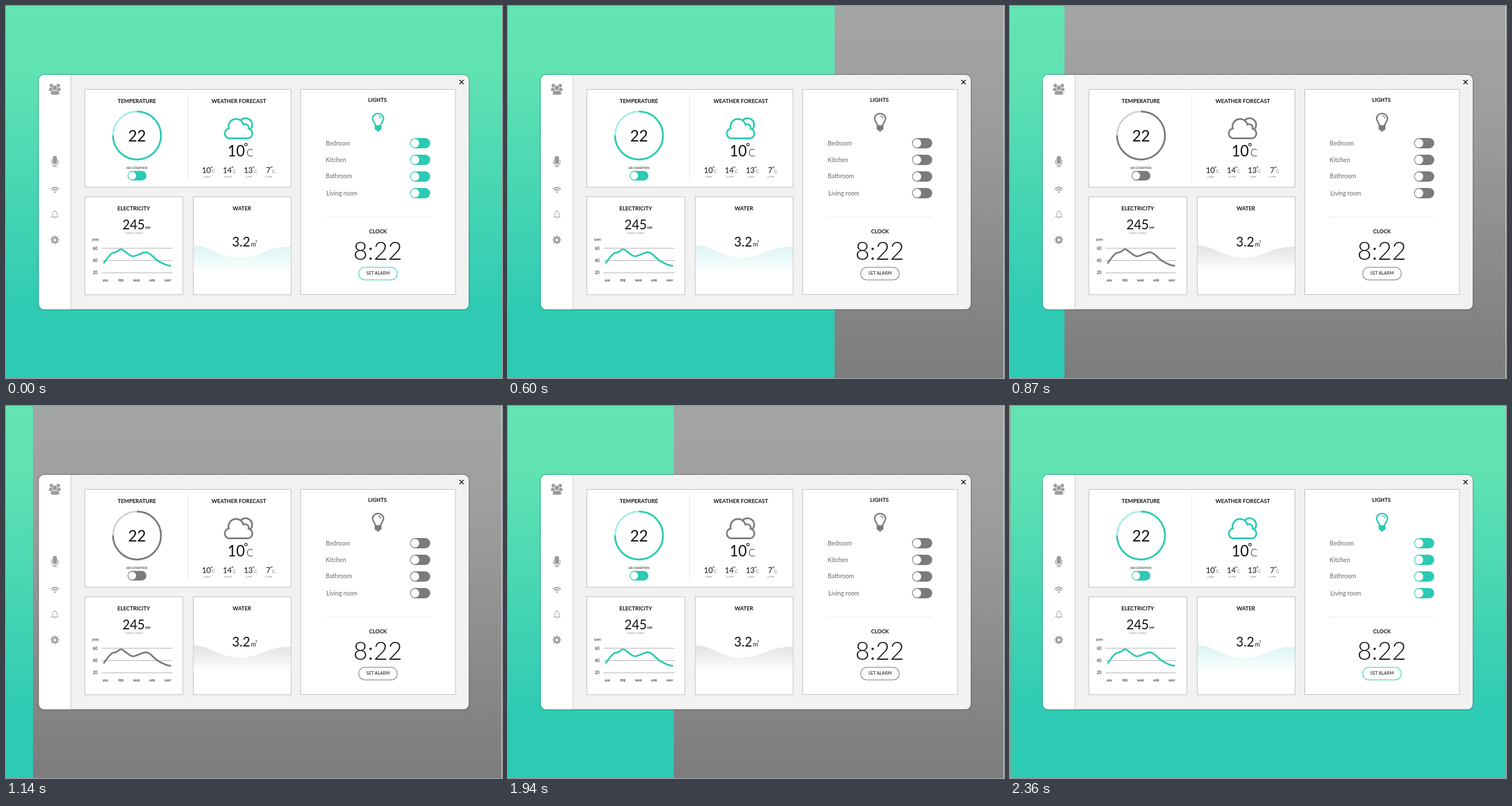
These frames come from a looping animation (864x648 px, 3.13 s). An HTML page:

```html
<!DOCTYPE html>
<html lang="en">
<head>
<meta charset="utf-8">
<title>Smart home dashboard</title>
<style>
  html, body { margin: 0; width: 100%; height: 100%; overflow: hidden; background: #fff; }
  svg { position: absolute; left: 0; top: 0; }
  text { font-family: Lato, "Open Sans", sans-serif; text-anchor: middle; }
  #seam { position: absolute; left: 0; top: 0; width: 1px; height: 648px; background: #9a9385; }
</style>
</head>
<body>
<div id="stage"></div>
<div id="seam"></div>
<script>
const LOOP = 3130, BACK = 1670;
const themes = {
  off: { main: '#7b7b7b', pale: '#d0d0d0', water: '#e2e2e2', pill: '#8a8a8a', width: 863.4,
         sky: [[0, '#a1a6a4'], [.08, '#a2a3a2'], [.3, '#9d9d9d'], [1, '#7c7c7c']] },
  on: { main: '#2bcab3', pale: '#a2efe5', water: '#d9f4f3', pill: '#45d3bc', width: 864,
        sky: [[0, '#62e4b3'], [.17, '#61e2b3'], [.5, '#47d6b3'], [.83, '#2ecab4'], [1, '#2dcab4']] }
};

const text = (s, x, y, size, weight = 400, fill = '#111', more = '') =>
  `<text x="${x}" y="${y}" font-size="${size}" font-weight="${weight}" fill="${fill}" ${more}>${s}</text>`;
const title = (s, x, y) => text(s, x, y, 9.4, 700);
const line = (x1, y1, x2, y2, color) => `<path d="M${x1} ${y1}L${x2} ${y2}" stroke="${color}"/>`;
const rect = (x, y, w, h, attrs) => `<rect x="${x}" y="${y}" width="${w}" height="${h}" ${attrs}/>`;
const circle = (x, y, r, attrs) => `<circle cx="${x}" cy="${y}" r="${r}" ${attrs}/>`;
const card = (x, y, w, h) => rect(x, y, w, h, 'fill="#fff" stroke="#bcbcbc"');
const toggle = (x, y, w, h, color) =>
  rect(x, y - h / 2, w, h, `rx="${h / 2}" fill="${color}"`) + circle(x + h / 2 - .3, y, h / 2 - 1.5, 'fill="#fff"');
const stops = list => list.map(([o, c]) => `<stop offset="${o}" stop-color="${c}"/>`).join('');
const gradient = (id, y1, y2, list) =>
  `<linearGradient id="${id}" gradientUnits="userSpaceOnUse" x1="0" x2="0" y1="${y1}" y2="${y2}">${stops(list)}</linearGradient>`;

const icons = () => `<g fill="#9b9b9b">
  <circle cx="79" cy="138.6" r="3.1"/><circle cx="91" cy="138.6" r="3.1"/>
  <path d="M75 148v-2.500q0-3 3-3h14q3 0 3 3v2.500z"/>
  <circle cx="85" cy="142.600" r="4.600" stroke="#fff"/>
  <path d="M77.500 154.500v-3q0-4 4-4h7.500q4 0 4 4v3q-7.700 1.200-15.500 0z" stroke="#fff" stroke-width=".8"/>
  <rect x="81.200" y="261.200" width="7.800" height="14" rx="3.900"/></g>
  <g fill="none" stroke="#9b9b9b" stroke-width="1.300">
  <path d="M79.300 268.500v3a5.800 5.800 0 0 0 11.600 0v-3M85.100 277.200v2.300M81 279.600h8.200"/>
  <path d="M78.200 318.800q6.900-5.600 13.800 0M80.700 321.500q4.400-3.500 8.800 0" stroke-width="1.800"/>
  <circle cx="85.100" cy="324.200" r="1.400" fill="#9b9b9b" stroke="none"/>
  <path d="M79.300 367.500q2.200-2 2.200-6a3.600 4 0 0 1 7.200 0q0 4 2.200 6zM83.700 368.500q1.400 1.700 2.800 0M85.100 357.500v-1.500" stroke-width="1"/>
  <circle cx="85.100" cy="407.400" r="4" stroke-width="3"/>
  <circle cx="85.100" cy="407.400" r="6.200" stroke-width="2.600" pathLength="16" stroke-dasharray="1 1" stroke-dashoffset=".5"/></g>`;

function climate(c) {
  const hours = [[10, 349, 358, '8 AM', 349.5], [14, 385.5, 394.5, '12 PM', 386.5],
                 [13, 422, 431, '4 PM', 423], [7, 457, 462.7, '8 PM', 457.5]];
  return card(137.3, 145.3, 359.2, 170.4) + line(316.5, 156, 316.5, 305, '#e4e4e4') +
    title('TEMPERATURE', 228, 168.5) + title('WEATHER FORECAST', 405.5, 168.5) +
    circle(228.2, 225.6, 41.8, `fill="none" stroke="${c.pale}" stroke-width="3"`) +
    `<path d="M228.200 183.800A41.800 41.800 0 1 1 186.400 225.600" fill="none" stroke="${c.main}" stroke-width="3"/>` +
    text('22', 228.3, 236.3, 27) + text('AIR CONDITION', 228, 283.6, 4.9) +
    toggle(211.8, 295.6, 32.8, 16.6, c.main) +
    `<g fill="none" stroke="${c.main}" stroke-width="3">
      <path d="M391.500 230.600A8.700 8.700 0 0 1 388 213.500A13 13 0 0 1 413.500 206.500A6.300 6.300 0 0 1 422.500 213.800A8.500 8.500 0 0 1 421 230.600Z"/>
      <path d="M408.500 199.500A10.600 10.600 0 1 1 426 214.500"/></g>` +
    text('10', 401, 262, 26) + circle(418, 241.6, 2.2, 'fill="none" stroke="#111" stroke-width="1.100"') +
    text('C', 424.8, 261.7, 17.5, 300) +
    hours.map(([n, x, d, label, lx]) => text(n, x, 291, 13.4) +
      circle(d, 280.8, 1.2, 'fill="none" stroke="#333" stroke-width=".8"') +
      text('C', d + 3.7, 290.5, 8.6, 300) + text(label, lx, 298.7, 4.6, 400, '#777')).join('');
}

function electricity(c) {
  const months = ['JAN', 'FEB', 'MAR', 'APR', 'MAY'];
  return card(137.3, 332.3, 170.6, 170.6) + title('ELECTRICITY', 222.5, 356.4) +
    text('245', 222.3, 388.6, 22.5) + text('kW', 247.3, 388.4, 5.4, 700) +
    text('YEARLY USAGE', 222.5, 396.6, 4.5, 400, '#888') + text('(kW)', 156, 409.4, 5, 700, '#333', 'letter-spacing=".500"') +
    [60, 40, 20].map((n, i) => text(n, 155.3, 424.6 + 21.2 * i, 7) +
      line(166.5, 422 + 21.4 * i, 290, 422 + 21.4 * i, '#aaa')).join('') +
    months.map((m, i) => text(m, 172.7 + 27.3 * i, 480, 5.1, 700, '#333')).join('') +
    `<path d="M170 448.500C175 441 180 433 186 430C191 429 193 429 196 426C199 423 202 423 205 426C211 430 216 436 221 436C228 436 236 429 244 429C251 429 257 439 265 444C273 449 280 452.500 287.500 452.500" fill="none" stroke="${c.main}" stroke-width="3"/>`;
}

const water = id => card(326.3, 332.3, 170.4, 170.6) +
  `<path d="M326.800 417C355 417 372 438.500 408 438.500C442 438.500 450 420 496.200 419V465H326.800Z" fill="url(#water-${id})"/>` +
  title('WATER', 411, 356.4) + text('3.2', 409.5, 418.8, 22.5) + text('m', 431, 419, 10.5) + text('3', 435.7, 412.4, 6);

function lights(c) {
  const rooms = [['Bedroom', 557, 243], ['Kitchen', 557, 271.8], ['Bathroom', 557, 300], ['Living room', 558, 329.6]];
  return card(513.4, 145.3, 269.6, 357.2) + title('LIGHTS', 647, 167.4) +
    `<g fill="none" stroke="${c.main}" stroke-width="2.600">
      <path d="M643.500 208.500C643.500 203 638.600 201.500 638.600 196.200A9.500 9 0 0 1 657.600 196.200C657.600 201.500 652.700 203 652.700 208.500"/>
      <path d="M648.500 191.300a5 4.600 0 0 1 4.300 4.700" stroke-width="1.500"/>
      <path d="M642.200 207.500h11.800v7.500l-3.200 1.500l-1.200 2.200h-3l-1.200-2.200l-3.200-1.500z" fill="${c.main}" stroke="none"/></g>` +
    rooms.map(([name, x, y], i) => text(name, x, y, 10.5, 400, '#666', 'style="text-anchor:start"') +
      toggle(703.8, 239 + 29 * i, 35.2, 17.8, c.main)).join('') +
    line(555.5, 368, 740, 368, '#e4e4e4') + title('CLOCK', 648, 396.4) + text('8:22', 647.6, 441.8, 43, 300) +
    rect(614.4, 455.2, 67.2, 22, `rx="11" fill="#fff" stroke="${c.pill}" stroke-width="1.200"`) +
    text('SET ALARM', 648, 467.6, 7.6);
}

const scene = (id, c) => `<svg id="${id}" width="864" height="648">
  <defs>${gradient('sky-' + id, 0, 648, c.sky)}${gradient('water-' + id, 417, 463, [[0, c.water], [1, '#fff']])}</defs>
  ${rect(0, 0, c.width, 648, `fill="url(#sky-${id})"`)}
  ${rect(57.5, 120, 748.5, 408.3, 'rx="9" fill="#f2f2f2" style="filter:drop-shadow(0 .5px 1.5px #0008)"')}
  <path d="M113 120H66.500a9 9 0 0 0-9 9V519.300a9 9 0 0 0 9 9H113Z" fill="#fff"/>
  ${line(113.3, 120, 113.3, 528.3, '#c6c6c6')}
  <path d="M789.800 128.800l7.400 7.400m0-7.400l-7.400 7.400" stroke="#111" stroke-width="1.500"/>
  ${icons()}${climate(c)}${electricity(c)}${water(id)}${lights(c)}</svg>`;

document.getElementById('stage').innerHTML = scene('off', themes.off) + scene('on', themes.on);
const lit = document.getElementById('on'), seam = document.getElementById('seam');

// Wipe edge: [time, x, speed in px/ms], joined by cubic curves
const keys = [[0, 864, 0], [300, 864, 0], [600, 569, -2.4], [840, 102, -.24], [1140, 47, 0], [1669, 47, 0],
              [BACK, 40, 0], [1940, 289, 1.61], [2180, 686, 1.44], [2360, 864, 0], [LOOP, 864, 0]];

function edgeAt(t) {
  const i = keys.findIndex(k => k[0] > t);
  const [t0, x0, v0] = keys[i - 1], [t1, x1, v1] = keys[i];
  const h = t1 - t0, s = (t - t0) / h, r = 1 - s;
  return x0 * r * r * (1 + 2 * s) + v0 * h * s * r * r + x1 * s * s * (3 - 2 * s) - v1 * h * s * s * r;
}

function draw(now) {
  const t = now % LOOP, base = t < BACK ? 0 : BACK;
  const step = base + Math.floor((t - base) / 30) * 30;
  lit.style.clipPath = `inset(0 ${864 - Math.round(edgeAt(step))}px 0 0)`;
  seam.style.display = t >= 2360 ? 'block' : 'none';
}

const start = performance.now();
function tick() {
  draw(performance.now() - start);
  requestAnimationFrame(tick);
}
tick();
</script>
</body>
</html>
```
